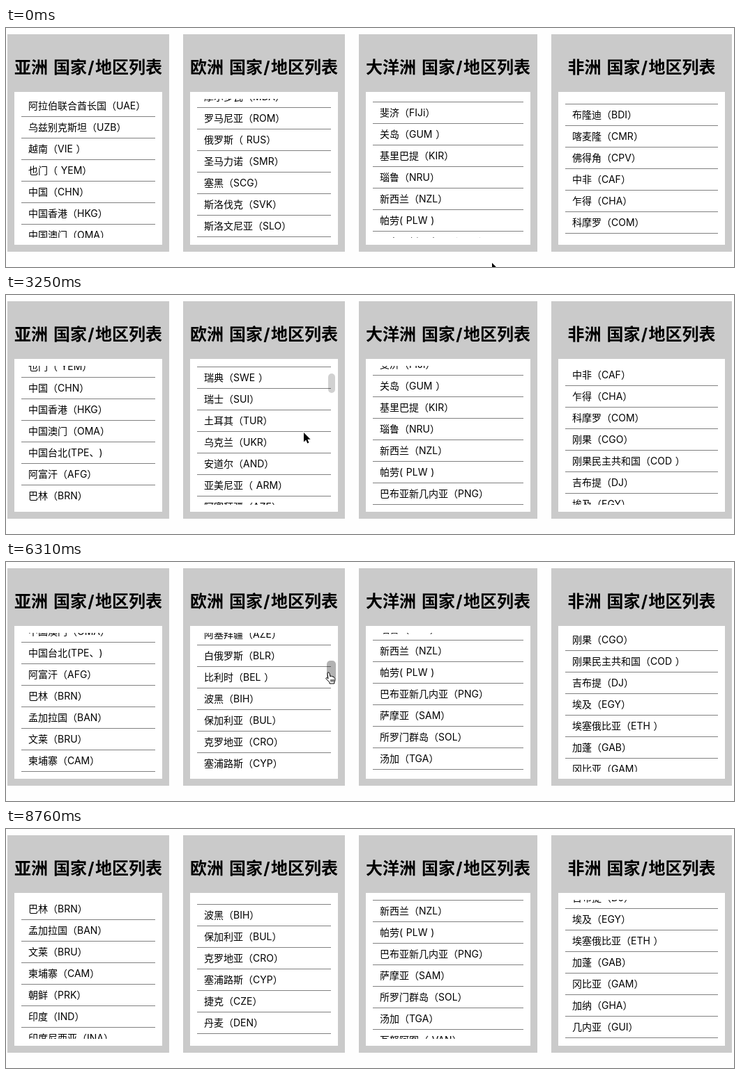
Recreate the animation shown at these times as an HTML page. Size 1044 by 344 pixels, loop 8.86 s.

```html
<!DOCTYPE html>
<html lang="zh-CN">
<head>
<meta charset="utf-8">
<title>国家/地区列表</title>
<style>
html, body { margin: 0; width: 100%; height: 100%; overflow: hidden; background: #fefefe; }
body { position: relative; color: #000; font: 14px/30px Inter, 'Noto Sans CJK SC', 'Noto Sans CJK', sans-serif; text-spacing-trim: space-all; }
.card { position: absolute; top: 9px; height: 313px; background: #cacaca; }
.card > * { position: absolute; }
h2 { left: 0; right: 0; top: 33px; margin: 0; text-align: center; white-space: nowrap; font-size: 24px; font-weight: 700; line-height: 30px; }
h2 b { margin-right: 8px; }
h2 i { display: inline-block; width: 12px; font-style: normal; }
.box { left: 10px; right: 10px; top: 83px; height: 220px; background: #fff; }
.view { left: 20px; right: 20px; top: 93px; height: 200px; overflow: hidden; }
ul { margin: 0; padding: 0; list-style: none; }
li { box-sizing: border-box; height: 31px; padding-left: 10px; border-bottom: 1px solid #808080; white-space: pre; word-spacing: .8px; }
.thumb { display: none; right: 14px; width: 10px; border-radius: 5px; background: rgba(0, 0, 0, .18); }
.thumb.wide { right: 13px; width: 13px; background: rgba(0, 0, 0, .3); }
svg { position: absolute; left: 0; top: 0; overflow: visible; }
</style>
</head>
<body>
<script>
const LOOP = 8860, STEP = 57.25, ROW = 31, VIEW = 200;
const DELAY = 53, SPEED = .0318; // automatic scroll, px per ms
const GRAB = 3650, RELEASE = 6470;

// pauses: [from, to] while hovered; moves: [from, to, distance] scrolled by hand;
// bar: when the scrollbar shows, and content px per thumb px.
const lists = [
  { name: '亚洲', x: 2, w: 232, top: -36,
    items: '土库曼斯坦（TKM）|阿拉伯联合酋长国（UAE）|乌兹别克斯坦（UZB）|越南（VIE ）|也门（ YEM）|中国（CHN）|中国香港（HKG）|中国澳门（OMA）|中国台北(TPE、)|阿富汗（AFG）|巴林（BRN）|孟加拉国（BAN）|文莱（BRU）|柬埔寨（CAM）|朝鲜（PRK）|印度（IND）|印度尼西亚（INA）|伊朗（IRI）' },
  { name: '欧洲', x: 254, w: 232, top: -18,
    pauses: [[2900, RELEASE]],
    moves: [[2900, 3200, 138], [3700, 5150, 972], [5230, 6280, -771]],
    bar: { from: 2900, to: RELEASE, ratio: 7.1 },
    items: '摩尔多瓦（MDA）|罗马尼亚（ROM）|俄罗斯（ RUS）|圣马力诺（SMR）|塞黑（SCG）|斯洛伐克（SVK）|斯洛文尼亚（SLO）|西班牙（ ESP）|瑞典（SWE ）|瑞士（SUI）|土耳其（TUR）|乌克兰（UKR）|安道尔（AND）|亚美尼亚（ ARM）|阿塞拜疆（AZE）|白俄罗斯（BLR）|比利时（BEL ）|波黑（BIH）|保加利亚（BUL）|克罗地亚（CRO）|塞浦路斯（CYP）|捷克（CZE）|丹麦（DEN）|爱沙尼亚（EST）|芬兰（FIN）|法国（FRA）|马其顿（MKD）|格鲁吉亚（GEO）|德国（GER）|英国（GBR）|希腊（GRE）|匈牙利（HUN）|冰岛（ISL）|爱尔兰（IRL）|以色列（ISR）|意大利（ITA）|拉脱维亚（LAT）|列支敦士登（LIE）|立陶宛（LTU）|卢森堡（LUX）|马耳他（ MLT）|摩纳哥（MON）|荷兰（NED）|挪威（NOR）|波兰（POL）|葡萄牙（POR）' },
  { name: '大洋洲', x: 506, w: 256, top: -26,
    pauses: [[750, 3280], [6550, 7480]],
    moves: [[900, 1900, 107], [2050, 2600, -107], [6700, 7300, -38]],
    bar: { from: 880, to: 2750, ratio: 2.06 },
    items: '库克群岛（COK）|斐济（FIJi）|关岛（GUM ）|基里巴提（KIR）|瑙鲁（NRU）|新西兰（NZL）|帕劳( PLW )|巴布亚新几内亚（PNG）|萨摩亚（SAM）|所罗门群岛（SOL）|汤加（TGA）|瓦努阿图（ VAN）|密克罗尼西亚（FSM）|美属萨摩亚（ASA）|澳大利亚（AUS）' },
  { name: '非洲', x: 782, w: 259, top: -23.95,
    pauses: [[7500, 7615]],
    items: '布基纳法索（BUR）|布隆迪（BDI）|喀麦隆（CMR）|佛得角（CPV）|中非（CAF）|乍得（CHA）|科摩罗（COM）|刚果（CGO）|刚果民主共和国（COD ）|吉布提（DJ）|埃及（EGY）|埃塞俄比亚（ETH ）|加蓬（GAB）|冈比亚（GAM）|加纳（GHA）|几内亚（GUI）|几内亚比绍（GBS）' }
];

// Cursor stops: [time, x, y]
const stops = [[0, 697, 338], [1000, 655, 190], [2000, 651, 172], [3250, 427, 198],
  [GRAB, 462, 129], [6300, 458, 158], [7300, 700, 200], [7900, 890, 360]];

// Eased progress from 0 to 1 between two times.
function ease(t, from, to) {
  const p = Math.min(1, Math.max(0, (t - from) / (to - from)));
  return p * p * (3 - 2 * p);
}

function autoScroll(t, pauses = []) {
  let run = Math.max(0, t - DELAY);
  for (const [from, to] of pauses) run -= Math.max(0, Math.min(t, to) - from);
  return run * SPEED;
}

const handScroll = (t, moves = []) =>
  moves.reduce((sum, [from, to, by]) => sum + by * ease(t, from, to), 0);

function cursorAt(t) {
  let [, x, y] = stops[0];
  for (let i = 1; i < stops.length; i++) {
    const p = ease(t, stops[i - 1][0], stops[i][0]);
    x += (stops[i][1] - stops[i - 1][1]) * p;
    y += (stops[i][2] - stops[i - 1][2]) * p;
  }
  return [Math.round(x), Math.round(y)];
}

for (const list of lists) {
  const card = document.createElement('div');
  const names = list.items.split('|');
  card.className = 'card';
  card.style.cssText = `left:${list.x}px;width:${list.w}px`;
  card.innerHTML = `<h2><b>${list.name}</b>国家<i>/</i>地区列表</h2><div class="box"></div>
    <div class="view"><ul>${names.map(s => `<li>${s}</li>`).join('')}</ul></div><div class="thumb"></div>`;
  document.body.append(card);
  list.ul = card.querySelector('ul');
  list.thumb = card.querySelector('.thumb');
  list.thumb.style.height = Math.round(VIEW * VIEW / (names.length * ROW)) + 'px';
}

document.body.insertAdjacentHTML('beforeend', `<svg width="20" height="20">
  <path id="arrow" d="M0 0V13.5L3.2 10.6 5.3 15.5 7.4 14.6 5.4 9.8H9.6Z" stroke="#fff" paint-order="stroke" stroke-width="1.6"/>
  <path id="hand" d="M4 10 3 3Q2.7 1 4 .8T6 2.5L7 7Q8.2 4.5 9.6 7.2 11 5.5 11.8 8 14 7.5 14 11.5 14 13.5 12.8 15V17H6V15.2L1.2 10.4Q.3 9 1.4 8.6T4 10ZM8 11V14.5M10 11V14.5M12 11V14.5" fill="#fff" stroke="#000" stroke-linejoin="round"/>
</svg>`);
const cursor = document.querySelector('svg');
const arrow = document.getElementById('arrow');
const hand = document.getElementById('hand');

function draw(time) {
  const t = Math.floor((time + 15) / STEP) * STEP;
  const grabbing = t >= GRAB && t < RELEASE;
  let [x, y] = cursorAt(t);
  for (const { top, pauses, moves, bar, ul, thumb } of lists) {
    const moved = handScroll(t, moves);
    ul.style.transform = `translateY(${Math.ceil(top - autoScroll(t, pauses) - moved)}px)`;
    if (!bar) continue;
    const shown = t >= bar.from && t < bar.to;
    const thumbY = Math.round(94 + moved / bar.ratio);
    thumb.style.display = shown ? 'block' : 'none';
    thumb.style.top = thumbY - 9 + 'px';
    thumb.classList.toggle('wide', grabbing);
    if (shown && grabbing) y = thumbY + 16; // the hand holds the thumb
  }
  arrow.style.display = grabbing ? 'none' : '';
  hand.style.display = grabbing ? '' : 'none';
  cursor.style.transform = `translate(${x}px, ${y}px)`;
}

const start = performance.now();
function tick() {
  draw((performance.now() - start) % LOOP);
  requestAnimationFrame(tick);
}
tick();
</script>
</body>
</html>
```
